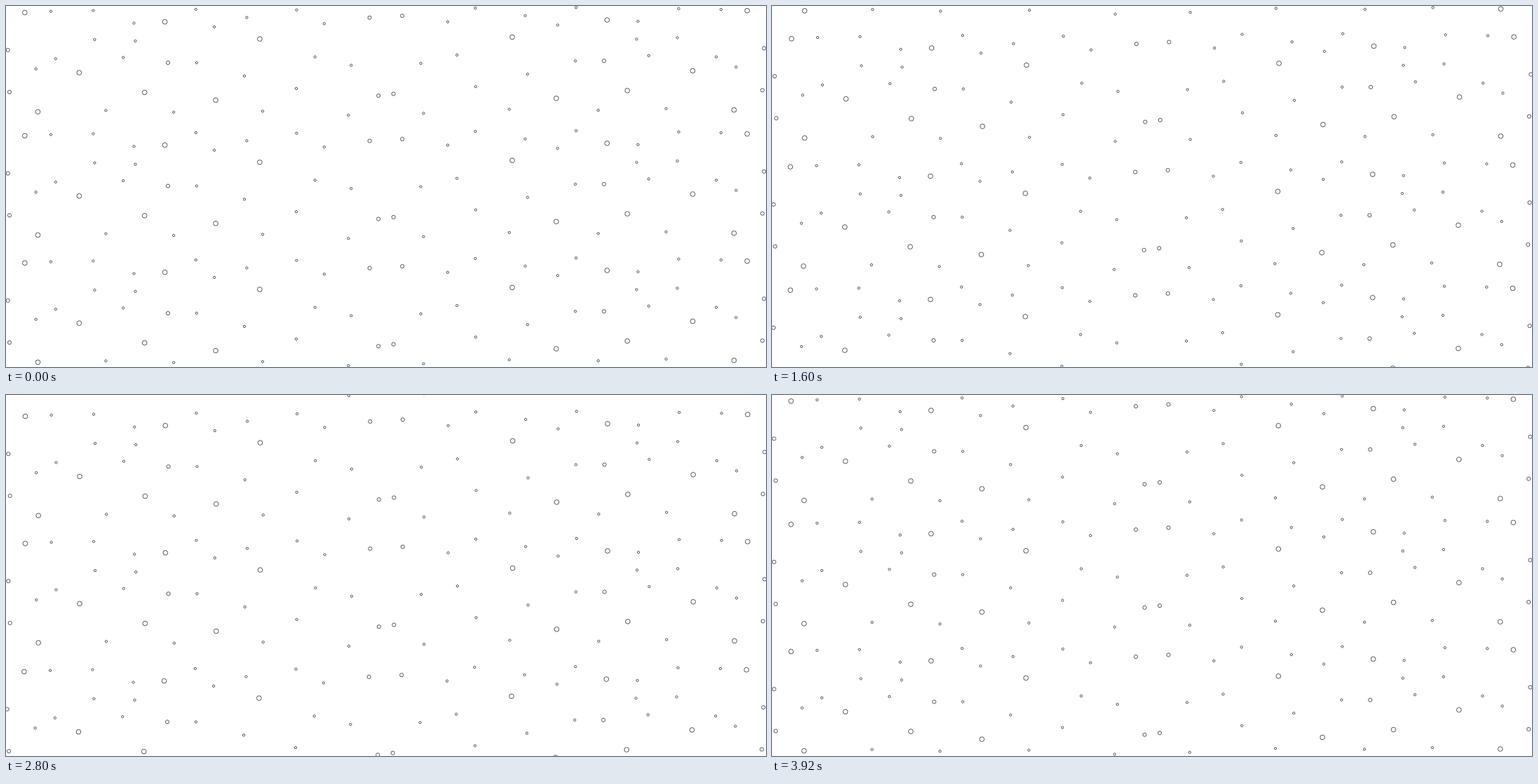
An HTML page for the animation above (4000 ms loop, 1084 px wide and 516 px high).

```html
<!DOCTYPE html>
<html lang="en">
<head>
<meta charset="utf-8">
<title>Drifting bubbles</title>
<style>
  html, body { margin: 0; width: 100%; height: 100%; overflow: hidden; background: #fff; }
  svg { display: block; width: 1084px; height: 516px; }
</style>
</head>
<body>
<svg viewBox="0 0 1084 516" xmlns="http://www.w3.org/2000/svg">
  <defs>
    <g id="half"></g>
    <!-- one band: the half and its slightly raised mirror image -->
    <g id="band">
      <use href="#half"/>
      <use href="#half" transform="matrix(-1 0 0 1 1083.9 -2.65)"/>
    </g>
    <g id="sheet">
      <use href="#band"/>
      <use href="#band" y="176.2"/>
      <use href="#band" y="358"/>
    </g>
  </defs>
  <g id="field" fill="none" stroke="#111" stroke-width="0.7">
    <use href="#sheet"/>
    <use href="#sheet" x="1.65" y="-541.2"/>
  </g>
</svg>
<script>
const LOOP = 4000, TICK = 80;
const STEP = { x: -0.0275, y: 11.033 };   // drift per tick

// Key points of the half band, "x,y" by bubble size
const BUBBLES = {
  large: { r: 3.35, at: [[26.8, 9.3], [226.6, 22.6], [361.9, 47.1], [104.4, 95.3],
    [197.7, 123.5], [299.1, 134.6], [45.5, 151.2]] },
  medium: { r: 2.6, at: [[231, 81.1], [5, 123], [2.7, 63], [518.7, 16.7], [531.2, 128.2]] },
  small: { r: 1.65, at: [[64, 7.6], [124.4, 6.4], [182.5, 24.5], [270.8, 4.8],
    [297.1, 29.9], [343.4, 16.4], [414.5, 5.7], [453.9, 25.3], [126.4, 48],
    [184.5, 50], [271.8, 81.1], [440.7, 72.8], [492.3, 84.7], [340, 100],
    [414, 117.9], [488.4, 156], [366.1, 150.3], [142.4, 149.3], [239.2, 151.7],
    [42.6, 89.9], [70.8, 75.4], [167.2, 73.6]] }
};

const half = document.getElementById('half');
const field = document.getElementById('field');

half.innerHTML = Object.values(BUBBLES).map(({ r, at }) =>
  at.map(([x, y]) => `<circle cx="${x}" cy="${y}" r="${r}"/>`).join('')
).join('');

function draw(ms) {
  const n = Math.floor((ms % LOOP) / TICK);
  field.setAttribute('transform', `translate(${n * STEP.x} ${n * STEP.y})`);
}

const start = performance.now();
function frame() {
  draw(performance.now() - start);
  requestAnimationFrame(frame);
}
draw(0);
requestAnimationFrame(frame);
</script>
</body>
</html>
```
